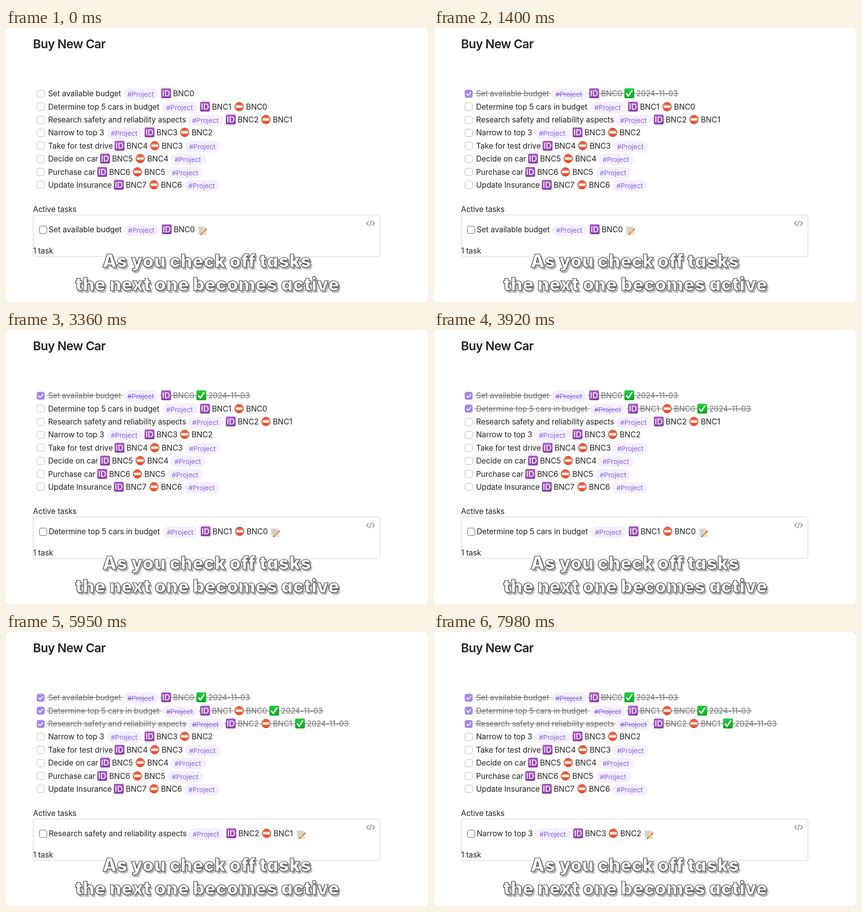
An HTML page that plays this animation: 852 by 554 pixels, repeating every 8 s.

```html
<!DOCTYPE html>
<html lang="en">
<head>
<meta charset="utf-8">
<title>Project tasks</title>
<style>
  html, body { margin: 0; width: 100%; height: 100%; overflow: hidden; background: #fff; }
  svg { display: block; }
  text { font: 15.55px Inter, sans-serif; letter-spacing: -.1px; fill: #222; white-space: pre; }
  .title { font-size: 24.5px; font-weight: 600; letter-spacing: -.6px; }
  .tag { font-size: 13.6px; letter-spacing: -.05px; fill: #8861dc; }
  .done { fill: #6c6c6c; }
  .id { font-size: 16px; font-weight: 500; letter-spacing: 0; fill: #fff; text-anchor: middle; }
  .caption { filter: drop-shadow(3.5px 4px 0 #b8b8b8); }
  .caption text {
    font-size: 36.5px; font-weight: 900; letter-spacing: .3px; font-feature-settings: "cv11";
    text-anchor: middle; fill: #fff; stroke: #333; stroke-width: 1.2px;
  }
  .line { fill: none; stroke-linecap: round; stroke-linejoin: round; }
</style>
</head>
<body>
<svg width="852" height="554" viewBox="0 0 852 554">
  <defs>
    <linearGradient id="red" x2="0" y2="1">
      <stop offset="0" stop-color="#d9452b"/><stop offset=".4" stop-color="#f0805c"/><stop offset="1" stop-color="#e2401f"/>
    </linearGradient>
    <linearGradient id="purple" x2="0" y2="1">
      <stop offset="0" stop-color="#ad5cc6"/><stop offset="1" stop-color="#8c40ab"/>
    </linearGradient>
    <linearGradient id="green" x2="0" y2="1">
      <stop offset="0" stop-color="#22cb3c"/><stop offset="1" stop-color="#0da521"/>
    </linearGradient>
    <g id="ident">
      <rect y="-10" width="20" height="20" rx="3" fill="url(#purple)"/>
      <text class="id" x="10" y="5.800">ID</text>
    </g>
    <g id="blocked">
      <circle cx="10" r="9" fill="url(#red)" stroke="#c23a22" stroke-width=".6"/>
      <rect x="3.200" y="-2.300" width="13.600" height="4.600" rx="1" fill="#fff"/>
    </g>
    <g id="finished">
      <rect y="-10" width="20" height="20" rx="3" fill="url(#green)"/>
      <path class="line" d="M4.500 1l3.700 4.500 7-11" stroke="#fff" stroke-width="2.800"/>
    </g>
    <g id="memo">
      <path d="M1-8H15L18 9H2z" fill="#e4e4e2" stroke="#cfcfcf" stroke-width=".6"/>
      <path class="line" d="M3.500-5h9M4-2h8M4 1h5M4.500 4h4" stroke="#a9a9a9"/>
      <path class="line" d="M8 7L16-1" stroke="#eda93c" stroke-width="3.600"/>
      <path class="line" d="M16.500-1.500l.8-.8" stroke="#d9796f" stroke-width="3.600"/>
      <path class="line" d="M6.500 8.500l1-1" stroke="#555" stroke-width="1.600"/>
    </g>
  </defs>
  <text class="title" x="54.500" y="41">Buy New Car</text>
  <g id="list"></g>
  <text x="54.500" y="372">Active tasks</text>
  <g id="active"></g>
  <text x="54.500" y="456">1 task</text>
  <g id="frame">
    <rect x="55" y="378" width="700" height="84" rx="4" fill="none" stroke="#e0e0e0" stroke-width="1.600"/>
    <path class="line" d="M732 391l-4 4 4 4M740 391l4 4-4 4M737.500 389.500l-3 11" stroke="#6e6e6e" stroke-width="1.200"/>
  </g>
  <g class="caption">
    <text x="405.500" y="484">As you check off tasks</text>
    <text x="406.500" y="531">the next one becomes active</text>
  </g>
  <path d="M0 0h2.500L0 2.500zM852 0h-2.500l2.500 2.500zM0 554h2.500L0 551.500zM852 554h-2.500l2.500-2.500z" fill="#c4c4c4"/>
</svg>
<script>
const LOOP = 8000;
const SPACE = 4.3, ICON = 20, TAG = 71;
const ROW_TOP = 132.5, ROW_STEP = 26.4;

// Label, its right edge in the list, and whether the tag closes the row
const tasks = [
  ['Set available budget', 232.5],
  ['Determine top 5 cars in budget', 311],
  ['Research safety and reliability aspects', 363],
  ['Narrow to top 3', 199],
  ['Take for test drive', 215, true],
  ['Decide on car', 185.7, true],
  ['Purchase car', 180, true],
  ['Update Insurance', 213.5, true],
];

const checkedAt = [1260, 3710, 5600];
const refreshedAt = [2100, 4200, 6440];
const frameHidden = [[4200, 4970], [6440, 7420]];

const byId = id => document.getElementById(id);

function checkbox(x, y, done, stroke) {
  const box = `<rect x="${x + .5}" y="${y - 7.5}" width="15" height="15" rx="3.5" `;
  return done
    ? box + `fill="#a488ee" stroke="#a488ee"/><path class="line" d="M${x + 4} ${y + .3}l2.800 3 5.400-6" stroke="#fff" stroke-width="1.8"/>`
    : box + `fill="#fff" stroke="${stroke}"/>`;
}

function taskRow(index, y, { shift = 0, done = false, memo = false } = {}) {
  const [label, labelEnd, tagLast] = tasks[index];
  const start = 85 + shift;
  const baseline = Math.round(y + 5.7);
  let x = labelEnd + shift, strikeFrom = start - 3, out = '', icons = '';

  const strike = (from, to, dy = -5.5, color = '#6c6c6c') => {
    if (done) out += `<path d="M${from} ${baseline + dy}H${to}" stroke="${color}" stroke-width="1.1"/>`;
  };
  const write = (str, at) => {
    out += `<text class="${done ? 'done' : ''}" x="${at}" y="${baseline}">${str}</text>`;
  };
  const icon = name => {
    x += SPACE;
    icons += `<use href="#${name}" x="${x}" y="${baseline - 6}"/>`;
    x += ICON;
  };
  const code = n => {
    x += SPACE - .3;
    write('BNC' + n, x);
    x += n === 1 ? 40.5 : 42.7;
  };
  const tag = () => {
    x += SPACE + .4;
    strike(strikeFrom, x - 1);
    out += `<rect x="${x}" y="${baseline - 16}" width="${TAG}" height="23.5" rx="11.75" fill="#f4f0fd"/>
      <text class="tag" x="${x + 8}" y="${baseline + 1}">#Project</text>`;
    strike(x + 8, x + 63, -3.5, '#8861dc');
    x += TAG + .8;
    strikeFrom = x + 1;
  };

  write(label, start);
  if (!tagLast) tag();
  icon('ident');
  code(index);
  if (index) { icon('blocked'); code(index - 1); }
  if (tagLast) tag();
  if (done) {
    icon('finished');
    write('2024-11-03', x + 4);
    x += 90;
  }
  strike(strikeFrom, x);
  if (memo) icons += `<use href="#memo" x="${x + 5.5}" y="${y + 1.5}"/>`;
  return out + icons;
}

function draw(checked, current, framed) {
  byId('list').innerHTML = tasks.map((_, i) => {
    const y = ROW_TOP + i * ROW_STEP, done = i < checked;
    return checkbox(62, Math.round(y + .2), done, '#bcbcbc') + taskRow(i, y, { done });
  }).join('');
  byId('active').innerHTML = checkbox(67, 408, false, framed ? '#666' : '#bcbcbc')
    + taskRow(current, 407.7, { shift: 1.2, memo: true });
  byId('frame').style.display = framed ? '' : 'none';
}

let shown = '';
function tick() {
  const t = performance.now() % LOOP;
  const passed = times => times.filter(at => t >= at).length;
  const state = [
    passed(checkedAt),
    passed(refreshedAt),
    !frameHidden.some(([from, to]) => t >= from && t < to),
  ];
  if (shown !== String(state)) {
    shown = String(state);
    draw(...state);
  }
  requestAnimationFrame(tick);
}
tick();
</script>
</body>
</html>
```
